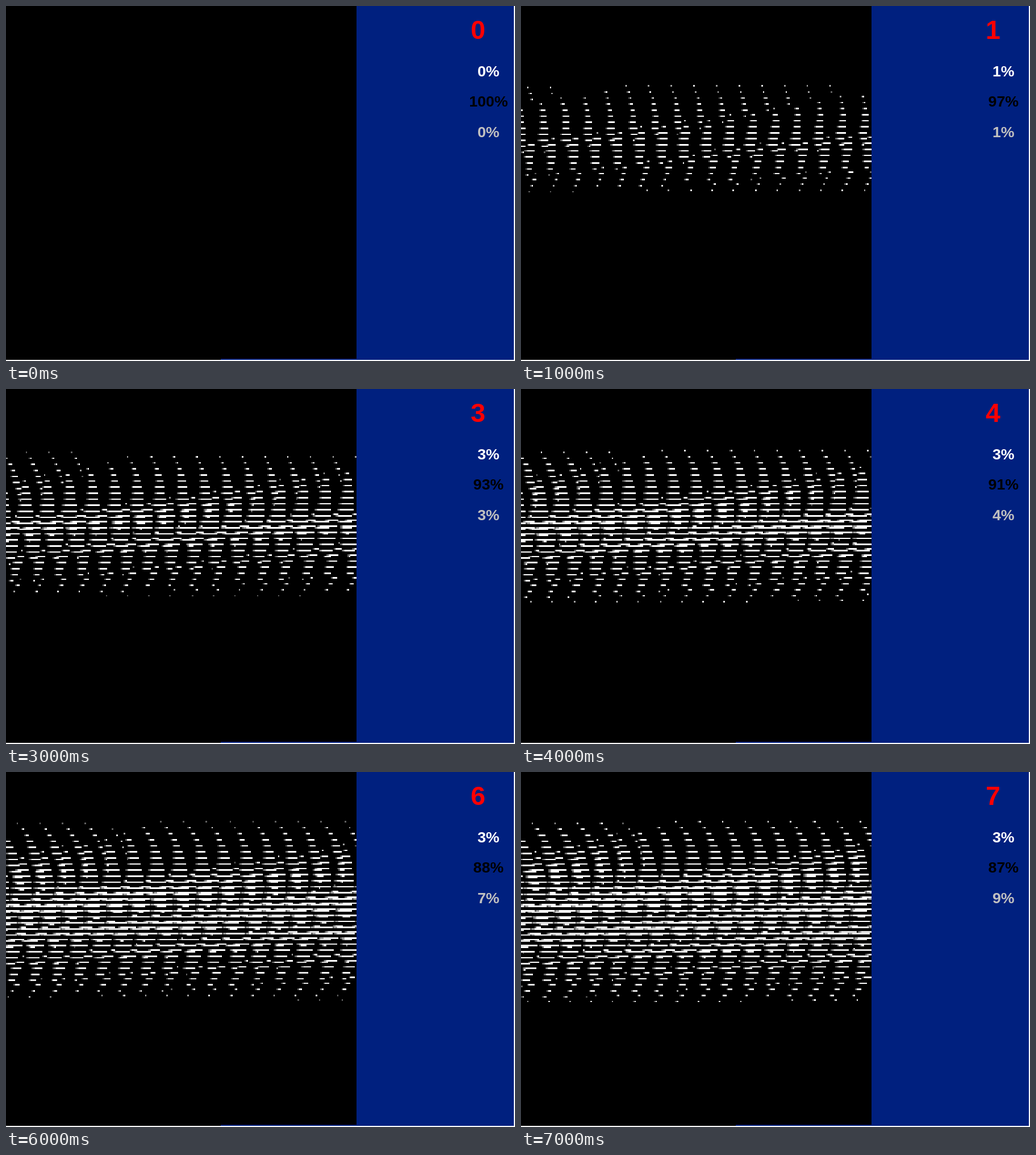
Animation, 896 px wide and 625 px high, one loop 8 s. Source, as an HTML page:

```html
<!DOCTYPE html>
<html lang="en">
<head>
<meta charset="utf-8">
<title>Row scan</title>
<style>
  html, body { margin: 0; width: 100%; height: 100%; overflow: hidden; background: #fff; }
  svg { display: block; width: 896px; height: 625px; }
  text { font-family: "Liberation Sans", Arial, sans-serif; font-weight: bold; font-size: 26.7px; text-anchor: middle; }
  #count { font-size: 46.5px; }
</style>
</head>
<body>
<svg viewBox="0 0 896 625">
  <rect width="894" height="623" fill="#00207f"/>
  <path d="M0 0H617V621H378V623H0Z" fill="#000"/>
  <clipPath id="view"><rect width="617" height="621"/></clipPath>
  <g id="dashes" clip-path="url(#view)" shape-rendering="crispEdges"></g>
  <text id="count" x="831" y="57.5" fill="#f00"></text>
  <text id="white" x="849.3" y="123.5" fill="#fff"></text>
  <text id="black" x="849.3" y="177" fill="#000"></text>
  <text id="gray" x="849.3" y="230.5" fill="#c0c0c0"></text>
</svg>
<script>
const $ = id => document.getElementById(id);
const CELL = 2.66, WIDTH = 617, MID = 245, SLOPE = 0.0055;
const share = {
  white: [0, 1, 2, 3, 3, 3, 3, 3],
  black: [100, 97, 95, 93, 91, 90, 88, 87],
  gray: [0, 1, 2, 3, 4, 5, 7, 9]
};
const shades = ["#fff", "#e4e4e4", "#a0a0a0", "#606060"];
const layers = shades.map(fill => {
  const p = document.createElementNS("http://www.w3.org/2000/svg", "path");
  p.setAttribute("fill", fill);
  $("dashes").append(p);
  return p;
});

const hash = (a, b) => {
  const v = Math.sin(a * 12.9898 + b * 78.233) * 43758.5453;
  return v - Math.floor(v);
};

// Sideways bend of a column at height y
function bend(y) {
  const d = y - MID;
  return d < 0 ? 42 - 0.0012 * d * d - 3.5e-8 * d ** 4 : 42 - 0.0025 * d * d;
}

// Dash length at height y after t seconds
function reach(y, t) {
  const root = Math.sqrt(t);
  const edge = y < MID ? 160 - 31 * root : 285 + 49 * root;
  return 21 * root * (1 - (y - MID) / (edge - MID));
}

function buildPaths(t) {
  const paths = shades.map(() => "");
  const run = (shade, from, to, y) => {
    if (to > from) {
      paths[shade] += `M${(from * CELL).toFixed(2)} ${y.toFixed(2)}h${((to - from) * CELL).toFixed(2)}v${CELL}H${(from * CELL).toFixed(2)}z`;
    }
  };
  if (!t) return paths;

  for (let n = -3; n < 36; n++) {
    const rowY = 90 + 10.62 * n - 0.0146 * n * n;
    const exact = x => (rowY - SLOPE * x - 162) / CELL;
    const last = Math.ceil(exact(0));
    for (let b = Math.floor(exact(WIDTH)); b <= last; b++) {
      const y = 162 + b * CELL;
      const gap = 40.4 - 0.0089 * (y - 90);
      const phase = bend(y) - 14 * (b - 4 * (n - 7));
      const start = ((phase % gap) + gap) % gap - gap;
      const full = Math.min(reach(y, t), gap + 4);
      for (let k = 0, x = start; x < WIDTH + 50; x = start + ++k * gap) {
        const off = Math.abs(exact(x) - b);
        const len = full - Math.max(0, off - 0.4) * 60;
        if (off >= 1 || len < 1) continue;
        const right = x + Math.min(len / 2, 6);
        const to = Math.round(right / CELL);
        const from = Math.min(to - 1, Math.round((right - len) / CELL));
        const top = y - CELL / 2;
        if (to - from < 2) {
          run(len < 2 ? 3 : hash(b, k) < 0.5 ? 2 : 1, from, to, top);
          continue;
        }
        const tail = Math.min(to - from - 1, 1 + Math.floor(len / 18));
        const pale = y > MID && t > 4 && hash(b, k) < 0.5;
        run(3, from, from + 1, top);
        run(2, from + 1, from + tail, top);
        run(pale ? 1 : 0, from + tail, to, top);
      }
    }
  }
  return paths;
}

const scenes = share.white.map((_, t) => buildPaths(t));
let shown = -1;

function draw(ms) {
  const t = Math.floor(ms / 1000) % 8;
  if (t === shown) return;
  shown = t;
  layers.forEach((p, i) => p.setAttribute("d", scenes[t][i]));
  $("count").textContent = t;
  for (const id in share) $(id).textContent = share[id][t] + "%";
}

function tick() {
  draw(performance.now());
  requestAnimationFrame(tick);
}
tick();
</script>
</body>
</html>
```
